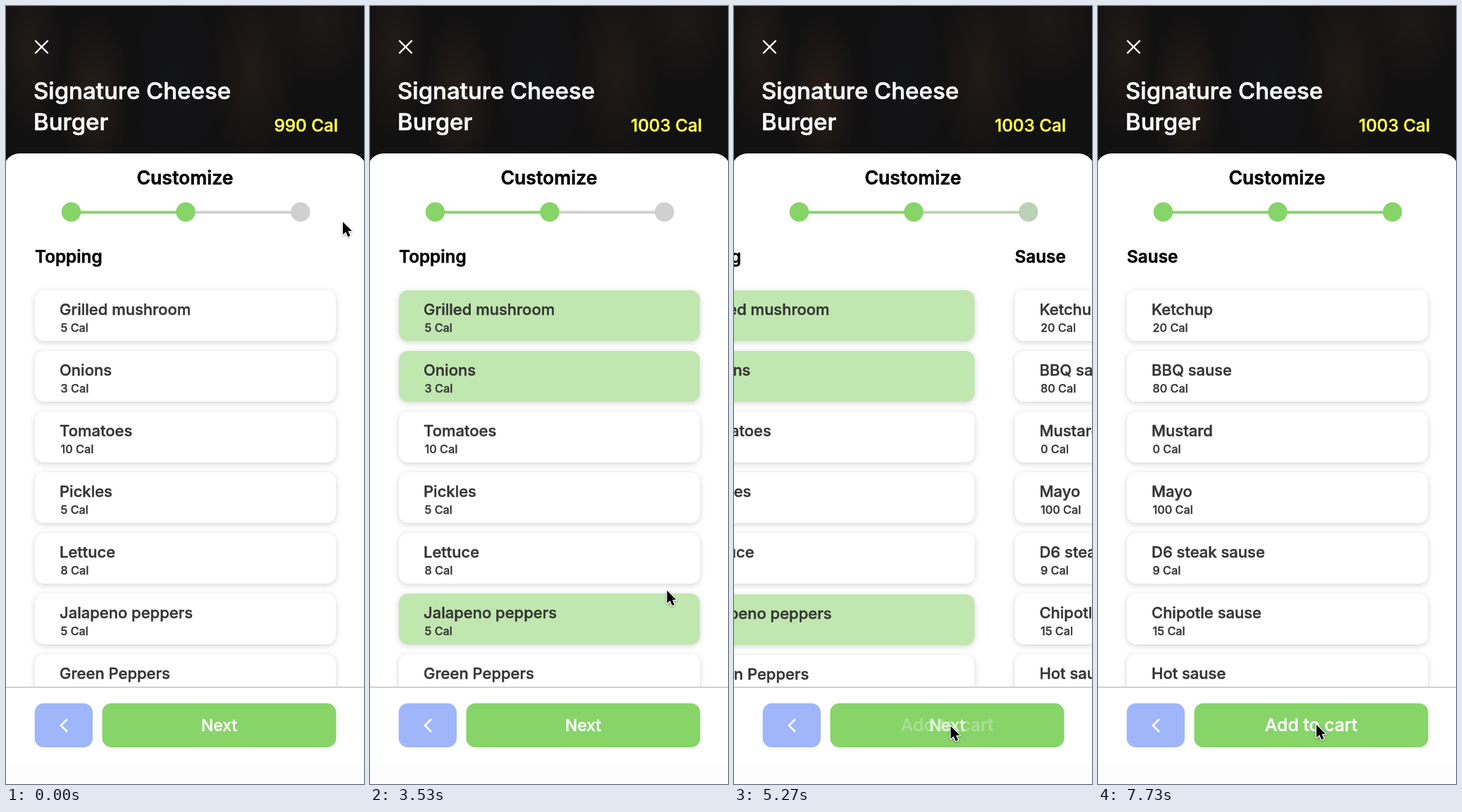
Animation, 508 px wide and 1103 px high, one loop 7.79 s. Source, as an HTML page with a canvas:

```html
<!DOCTYPE html>
<html lang="en">
<head>
<meta charset="utf-8">
<title>Customize</title>
<style>
  html, body { margin: 0; width: 100%; height: 100%; overflow: hidden; background: #fff; }
  canvas { display: block; width: 508px; height: 1103px; }
</style>
</head>
<body>
<canvas id="stage"></canvas>
<script>
const W = 508, H = 1103, LOOP = 7790;
const GREEN = '#87d469', GREY = '#d0d0d0', PICKED = '#c1e7b0', INK = '#343434';
const canvas = document.getElementById('stage');
const ctx = canvas.getContext('2d');
const dpr = window.devicePixelRatio || 1;
canvas.width = W * dpr;
canvas.height = H * dpr;

const toppings = {
  title: 'Topping',
  items: [['Grilled mushroom', 5], ['Onions', 3], ['Tomatoes', 10], ['Pickles', 5],
          ['Lettuce', 8], ['Jalapeno peppers', 5], ['Green Peppers', 4]],
  picks: { 0: 2020, 1: 3070, 5: 2440 }
};
const sauces = {
  title: 'Sause',
  items: [['Ketchup', 20], ['BBQ sause', 80], ['Mustard', 0], ['Mayo', 100],
          ['D6 steak sause', 9], ['Chipotle sause', 15], ['Hot sause', 5]],
  picks: {}
};
const totals = [[-1000, 990], [2020, 995], [2440, 1000], [3070, 1003]];
const presses = [[1920, 2050], [2350, 2460], [2980, 3090], [4465, 4660]];
const slide = { start: 4697, length: 1350, gap: 484 };

const clamp = v => Math.max(0, Math.min(1, v));
const inQuad = p => p * p;
const outCubic = p => 1 - (1 - p) ** 3;
const smooth = p => p * p * (3 - 2 * p);
const inOutQuart = p => p < .5 ? 8 * p ** 4 : 1 - 8 * (1 - p) ** 4;
const fade = (t, start) => smooth(clamp((t - start) / 200));

// from time, to time, end x, end y, easing
const moves = [
  [70, 1120, 388, 433, smooth],
  [2070, 2330, 425, 870, smooth],
  [2670, 2960, 425, 528, smooth],
  [3200, 3530, 422, 828, inQuad],
  [3530, 4220, 307.5, 1021, outCubic],
  [7725, 7726, 310, 1019, smooth]
];

function pointer(t) {
  let x = 478, y = 306;
  for (const [a, b, toX, toY, ease] of moves) {
    const p = ease(clamp((t - a) / (b - a)));
    x += (toX - x) * p;
    y += (toY - y) * p;
  }
  return [x, y];
}

function mix(a, b, p) {
  const part = (c, i) => parseInt(c.slice(i, i + 2), 16);
  return `rgb(${[1, 3, 5].map(i => Math.round(part(a, i) + (part(b, i) - part(a, i)) * p))})`;
}

// A thin round-joined outline softens the corners of the letters.
function text(str, x, y, size, color, { weight = 500, align = 'left', alpha = 1 } = {}) {
  if (alpha <= 0) return;
  ctx.save();
  ctx.globalAlpha = alpha;
  ctx.font = `${weight} ${size}px Inter, "Liberation Sans", sans-serif`;
  ctx.textAlign = align;
  ctx.lineJoin = ctx.lineCap = 'round';
  ctx.lineWidth = size * .02;
  ctx.fillStyle = ctx.strokeStyle = color;
  ctx.fillText(str, x, y);
  ctx.strokeText(str, x, y);
  ctx.restore();
}

function box(x, y, w, h, r, color) {
  ctx.fillStyle = color;
  ctx.beginPath();
  ctx.roundRect(x, y, w, h, r);
  ctx.fill();
}

function line(color, width, ...pts) {
  ctx.strokeStyle = color;
  ctx.lineWidth = width;
  ctx.beginPath();
  pts.forEach(([x, y], i) => i ? ctx.lineTo(x, y) : ctx.moveTo(x, y));
  ctx.stroke();
}

function glow(x, y, rx, ry, rgb, alpha) {
  ctx.save();
  ctx.translate(x, y);
  ctx.scale(rx, ry);
  const g = ctx.createRadialGradient(0, 0, 0, 0, 0, 1);
  g.addColorStop(0, `rgba(${rgb},${alpha})`);
  g.addColorStop(1, `rgba(${rgb},0)`);
  ctx.fillStyle = g;
  ctx.fillRect(-1, -1, 2, 2);
  ctx.restore();
}

function header(t) {
  ctx.fillStyle = '#121112';
  ctx.fillRect(0, 0, W, 232);
  glow(35, 60, 45, 130, '50,38,30', .5);
  glow(125, 130, 50, 120, '54,39,29', .6);
  glow(240, 110, 60, 130, '21,23,27', .6);
  glow(350, 90, 60, 140, '50,37,28', .5);
  glow(445, 20, 70, 90, '42,34,28', .5);
  ctx.lineCap = 'round';
  line('#fff', 2.4, [42, 49.5], [59, 66.5]);
  line('#fff', 2.4, [59, 49.5], [42, 66.5]);
  text('Signature Cheese', 39, 131.5, 33, '#fff');
  text('Burger', 39, 175.5, 33, '#fff');
  totals.forEach(([start, value], i) => {
    const next = totals[i + 1];
    const alpha = fade(t, start) * (next ? 1 - fade(t, next[0]) : 1);
    text(value + ' Cal', 471, 178, 24.3, '#ffff58', { align: 'right', alpha });
  });
}

function progress(p) {
  const last = mix(GREY, GREEN, p);
  text('Customize', 254, 252.5, 26.6, '#000', { weight: 600, align: 'center' });
  ctx.lineCap = 'butt';
  line(GREEN, 4, [93, 292.5], [255, 292.5]);
  line(last, 4, [255, 292.5], [418, 292.5]);
  [[92.5, GREEN], [255, GREEN], [417.8, last]].forEach(([x, c]) => box(x - 13.7, 278.3, 27.4, 27.4, 13.7, c));
}

function list({ title, items, picks }, x, t, sink) {
  text(title, x, 363.8, 24.3, '#000', { weight: 600 });
  items.forEach(([name, cal], i) => {
    const y = 403 + 86 * i + (i > 4 ? sink : 0);
    const p = i in picks ? fade(t, picks[i]) : 0;
    ctx.save();
    ctx.shadowColor = 'rgba(0,0,0,.17)';
    ctx.shadowBlur = 9 * dpr;
    ctx.shadowOffsetY = 2 * dpr;
    box(x, y, 427, 72, 13, mix('#ffffff', PICKED, p));
    ctx.restore();
    text(name, x + 35, y + 34.5, 22, INK);
    text(cal + ' Cal', x + 36.5, y + 58.8, 16.3, INK);
  });
}

function footer(p) {
  ctx.fillStyle = '#fff';
  ctx.fillRect(0, 965, W, 138);
  ctx.fillStyle = '#fcfcfc';
  ctx.fillRect(0, 1078, W, 25);
  ctx.fillStyle = '#c2c2c2';
  ctx.fillRect(0, 965, W, 1.5);
  box(40.7, 988.5, 82.3, 62.6, 13, '#9fb6fb');
  box(136.5, 988.5, 332, 62.6, 13, GREEN);
  ctx.lineCap = 'butt';
  ctx.lineJoin = 'miter';
  line('#fff', 2.6, [87, 1011], [78, 1020], [87, 1029]);
  text('Next', 302.5, 1028.3, 22.8, '#fff', { align: 'center', alpha: 1 - p });
  text('Add to cart', 302.5, 1028.3, 24.8, '#fff', { align: 'center', alpha: p });
}

function arrow(x, y) {
  ctx.save();
  ctx.translate(x, y);
  const shape = new Path2D('M0 0V18L4.2 14.2L7.2 21.2L10.4 19.8L7.5 13H13Z');
  ctx.lineJoin = 'round';
  ctx.lineWidth = 2.4;
  ctx.strokeStyle = '#fff';
  ctx.shadowColor = 'rgba(0,0,0,.35)';
  ctx.shadowBlur = 3 * dpr;
  ctx.shadowOffsetY = dpr;
  ctx.stroke(shape);
  ctx.shadowColor = 'transparent';
  ctx.fillStyle = '#000';
  ctx.fill(shape);
  ctx.restore();
}

function draw(t) {
  const p = inOutQuart(clamp((t - slide.start) / slide.length));
  const x = 41 - slide.gap * p;
  ctx.setTransform(dpr, 0, 0, dpr, 0, 0);
  ctx.fillStyle = '#fff';
  ctx.fillRect(0, 0, W, H);
  header(t);
  box(-3, 209, W + 6, 800, [22, 22, 0, 0], '#fff');
  progress(p);
  list(toppings, x, t, 4 * p);
  list(sauces, x + slide.gap, t, 0);
  footer(p);
  const [px, py] = pointer(t);
  if (presses.some(([a, b]) => t >= a && t < b)) {
    ctx.beginPath();
    ctx.arc(px - 1, py + 1, 29.5, 0, 7);
    ctx.strokeStyle = '#000';
    ctx.lineWidth = 2;
    ctx.stroke();
  }
  arrow(px, py);
}

function tick(now) {
  draw(now % LOOP);
  requestAnimationFrame(tick);
}
requestAnimationFrame(tick);
</script>
</body>
</html>
```
